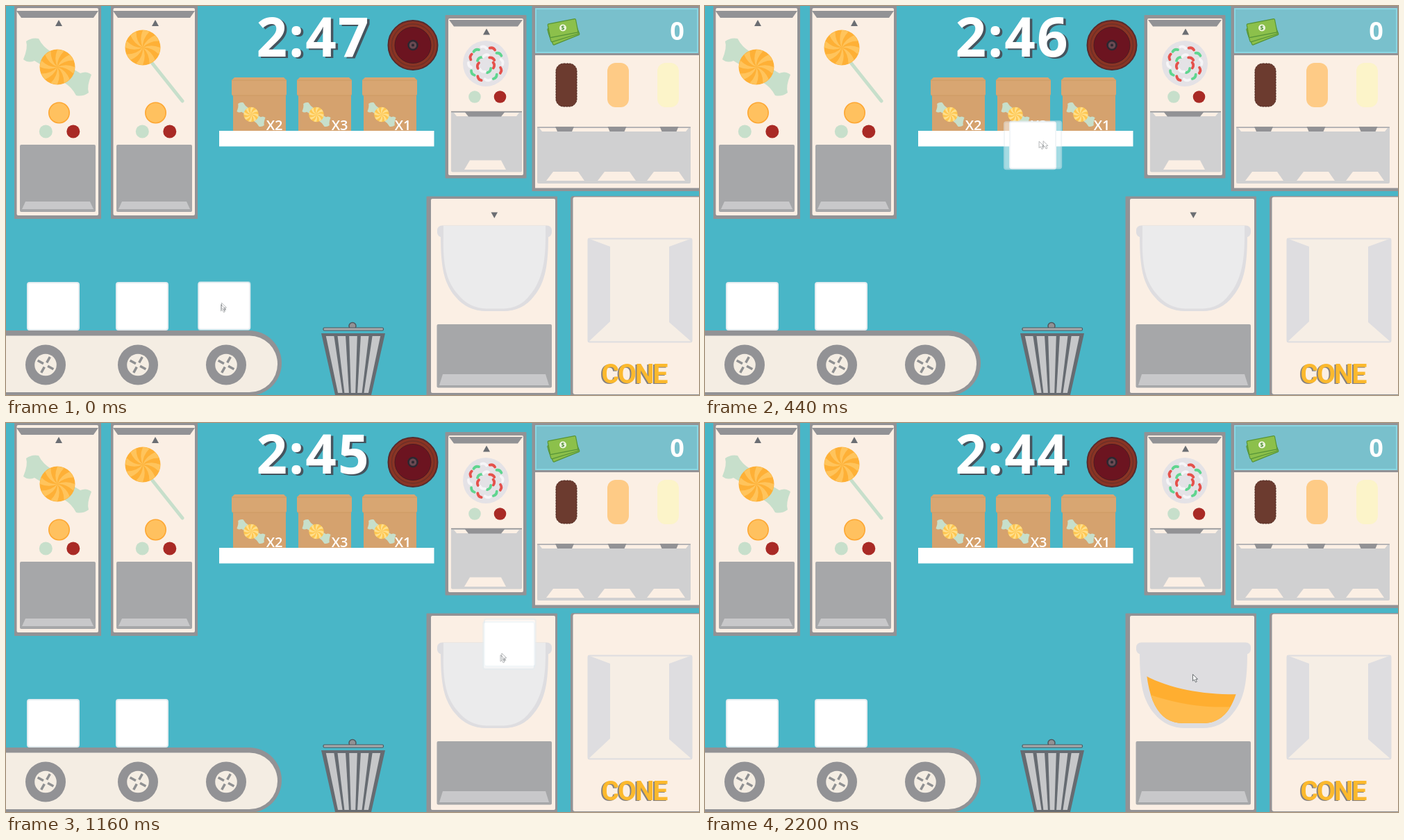
Write an HTML page that moves like this. It is 998x561 px and loops after 2.24 s.

```html
<!DOCTYPE html>
<html lang="en">
<head>
<meta charset="utf-8">
<title>Candy factory</title>
<style>
  html, body { margin: 0; width: 100%; height: 100%; overflow: hidden; background: #49b6c7; }
  svg { display: block; width: 100%; height: 100%; --base: #feb036; --ray: #ffc45c; }
  text { font-family: "Open Sans", "Noto Sans", sans-serif; font-weight: 700; fill: #fff; }
  .mid { text-anchor: middle; }
  .clock { font-size: 78px; letter-spacing: 2px; }
  .shade { fill: #46545e; }
  .count { font-size: 20px; font-weight: 600; text-anchor: end; }
  .sign text { font: 600 39px Roboto, "Open Sans", sans-serif; letter-spacing: -2px; }
  .pale { --base: #fec650; --ray: #ffdf8c; }
  .steel { fill: #929295; }
  .cream { fill: #fbefe4; }
  .dark { fill: #6b6e73; }
  .well { fill: #a6a7a9; }
  .tray { fill: #d0d0d1; }
  .lip { fill: #c8c8ca; }
  .mint { fill: #c7dfcb; }
  .red { fill: #a92a25; }
  .glass { fill: #dedde0; }
  .pair { isolation: isolate; }
  .pair use { opacity: .5; mix-blend-mode: plus-lighter; }
</style>
</head>
<body>
<svg viewBox="0 0 998 561" xmlns="http://www.w3.org/2000/svg">
  <defs>
    <rect id="cube" x="-37" y="-34" width="74" height="68" rx="3" fill="#fff" stroke="#e4ecf0" stroke-width="2"/>
    <path id="arrow" d="M0 0V9.500L2.200 7.500 4 11.300 5.800 10.400 4.100 6.800H7Z" fill="#fff" stroke="#5b6064" stroke-width=".9"/>
    <g id="swirl"><circle r="25.500" style="fill:var(--base)"/></g>
    <path id="twist" class="mint" d="M9 22Q21 29 27 41Q37 43 45 37Q42 28 49 11Q42 5 33 9L23 3Z"/>
    <g id="candy">
      <use href="#twist"/><use href="#twist" transform="rotate(180)"/><use href="#swirl"/>
    </g>
    <g id="vendor">
      <rect class="steel" x="12" y="-4" width="125" height="311"/>
      <rect class="cream" x="15.500" y="3" width="117.500" height="299" rx="2"/>
      <path class="steel" d="M15 7H133L126 17H22Z"/>
      <path class="dark" d="M71 29H81L76 20Z"/>
      <circle cx="76.500" cy="154" r="14.700" fill="#ffc15f" stroke="#fda733" stroke-width="1.600"/>
      <circle class="mint" cx="57.300" cy="181" r="9.500"/>
      <circle class="red" cx="96.800" cy="181" r="9.500"/>
      <rect class="well" x="20" y="200" width="109" height="97" rx="2"/>
      <path class="lip" d="M23 293 28 282H121L126 293Z"/>
    </g>
    <g id="carton">
      <path d="M327 126H403V180H327Z" fill="#d5a26e"/>
      <path d="M325 107 329 103H400L404 107V127Q404 129 402 129H327Q325 129 325 127Z" fill="#d8a672"/>
      <path d="M325 107H404M326 129H403" stroke="#cd9a63" fill="none"/>
      <use class="pale" href="#candy" transform="translate(353 156.500) scale(.42)"/>
    </g>
    <g id="wheel">
      <circle class="steel" r="29"/>
      <circle r="15.800" fill="#f4ede3"/>
      <path d="M3.500 0H13M-3.500 0H-13M0 3.500V13M0 -3.500V-13" transform="rotate(29)" stroke="#8f9092" stroke-width="3.500"/>
    </g>
    <path id="notch" class="steel" d="M-13.500 -3.500H13.500L10.500 3.500H-10.500Z"/>
    <path id="ramp" class="cream" d="M-28 252-18 239H18L27 252Z"/>
    <rect id="bill" x="-20.500" y="-10" width="41" height="20" rx="1.500" fill="#8cc04b" stroke="#569438" stroke-width="1.200"/>
    <path id="bowl" d="M626 330C626 378 631 400 647 419Q664 440 692 440H716Q744 440 760 419C776 400 781 376 781 330Z"/>
    <clipPath id="inside"><path d="M634 330C635 398 652 433 688 433H718C754 433 772 395 773 330Z"/></clipPath>
  </defs>

  <rect width="998" height="561" fill="#49b6c7"/>

  <use href="#vendor"/>
  <use href="#candy" transform="translate(74 88)"/>
  <use href="#vendor" x="139"/>
  <path d="M211 83 254 137" stroke="#c7dfcb" stroke-width="5" stroke-linecap="round"/>
  <use href="#swirl" transform="translate(197 60)"/>

  <g class="clock mid">
    <text class="time shade" x="446" y="75">2:47</text>
    <text class="time" x="442.500" y="73">2:47</text>
  </g>

  <g>
    <circle cx="586" cy="56.500" r="35.500" fill="#8a3424" stroke="#572b2d" stroke-width="2"/>
    <circle cx="586" cy="56.500" r="30.500" fill="none" stroke="#6e3027" stroke-width="1.500"/>
    <circle cx="586" cy="56.500" r="26" fill="#6c1420" stroke="#4b1a22"/>
    <circle cx="586" cy="56.500" r="6.500" fill="#6a4a52" stroke="#2b2831" stroke-width="2.500"/>
    <circle cx="586" cy="56.500" r="2" fill="#2b2831"/>
  </g>

  <use href="#carton"/><use href="#carton" x="94"/><use href="#carton" x="188"/>
  <text class="count" x="398.500" y="179">X2</text>
  <text class="count" x="492.500" y="179">X3</text>
  <text class="count" x="583.500" y="179">X1</text>
  <rect x="307" y="180" width="309.500" height="22.500" fill="#fff"/>

  <!-- sprinkles -->
  <g>
    <rect class="steel" x="632.500" y="13" width="117" height="235.500" rx="1"/>
    <rect class="cream" x="637" y="18" width="108" height="226" rx="2"/>
    <path class="steel" d="M638 20H744L737 29.500H645Z"/>
    <path class="dark" d="M687 41.500H697L692 32.500Z"/>
    <g transform="translate(691 83)" fill="none" stroke-width="3.800" stroke-linecap="round">
      <circle r="33" fill="#e4e2e6"/>
      <g id="sprinkles"></g>
    </g>
    <circle class="mint" cx="675" cy="131" r="8.800"/>
    <circle class="red" cx="711.500" cy="131" r="8.800"/>
    <rect class="tray" x="641" y="152" width="102" height="87.500" rx="2"/>
    <path class="cream" d="M645 154H739L735 159H649Z"/>
    <path d="M641 152.500H743" stroke="#929295" stroke-width="1.500"/>
    <path class="steel" d="M660 152H719L713 159.500H666Z"/>
    <path class="cream" d="M660 236 668 222.500H713L720 236Z"/>
  </g>

  <!-- money and sauces -->
  <g>
    <rect class="steel" x="757.500" y="-2" width="245" height="269"/>
    <rect x="763" y="4" width="233" height="63" fill="#79c0cc" stroke="#8ad7e3" stroke-width="2"/>
    <rect class="cream" x="762" y="71" width="240" height="191.500"/>
    <use href="#bill" transform="translate(803.500 39.500) rotate(-22)"/>
    <use href="#bill" transform="translate(802 36.500) rotate(-17)"/>
    <use href="#bill" transform="translate(802 32) rotate(-11)"/>
    <circle cx="802" cy="31.500" r="5" fill="#eef5de"/>
    <text class="mid" x="802" y="34.600" style="font-size:8.500px;fill:#4f9136">$</text>
    <text class="mid" x="966.500" y="49" style="font-size:36px">0</text>
    <rect x="792" y="83" width="30" height="62" rx="11" fill="#6c3b2f" stroke="#502a22" stroke-dasharray="3 1"/>
    <rect x="866" y="82" width="31" height="64" rx="12" fill="#fecb86"/>
    <rect x="938" y="82" width="31" height="64" rx="12" fill="#fcf4c9"/>
    <rect class="tray" x="765" y="174.500" width="221" height="81.500" rx="2"/>
    <path class="cream" d="M768 176H983L979 181H772Z"/>
    <path d="M765 175H986" stroke="#929295"/>
    <use href="#notch" x="804.500" y="177.500"/><use href="#notch" x="880" y="177.500"/><use href="#notch" x="955" y="177.500"/>
    <use href="#ramp" x="806"/><use href="#ramp" x="880"/><use href="#ramp" x="951"/>
  </g>

  <!-- mixer -->
  <g>
    <rect class="steel" x="605.500" y="274.500" width="188.500" height="290" rx="1"/>
    <rect class="cream" x="612" y="278" width="179" height="280" rx="2"/>
    <path id="hint" class="dark" d="M698.500 297.500H708L703.300 306Z"/>
    <rect class="glass" x="621" y="316.500" width="165" height="17" rx="7"/>
    <use class="glass" href="#bowl"/>
    <path id="empty" fill="#ebebec" d="M630 317H777V333C777 374 770 398 755 416Q741 436 716 436.500H692Q667 436 651 416C635 398 629 376 630 333Z"/>
    <g id="mix" clip-path="url(#inside)">
      <path id="back" fill="#ffae30"/>
      <path id="front" fill="#ffbb4d"/>
    </g>
    <rect class="well" x="620.500" y="459" width="165.500" height="91.500" rx="2"/>
    <path class="lip" d="M624 547 629 531H777L782 547Z"/>
  </g>

  <!-- cones -->
  <g>
    <rect class="steel" x="813" y="274" width="200" height="295" rx="4"/>
    <rect class="cream" x="816.500" y="275.500" width="200" height="284.500" rx="3"/>
    <rect x="838.500" y="335.500" width="149" height="149" rx="2" fill="#f6eee5" stroke="#dedde0" stroke-width="2"/>
    <path class="glass" d="M838 335 870 347V455L838 485ZM988 335 955 347V456L988 485Z"/>
    <g class="mid sign">
      <text x="902.500" y="545" style="fill:#85807f">CONE</text>
      <text x="904.500" y="544" style="fill:#fcb92d">CONE</text>
    </g>
  </g>

  <!-- conveyor -->
  <rect class="steel" x="-60" y="468" width="457" height="94" rx="47"/>
  <rect x="-60" y="475.500" width="451" height="81.500" rx="40.500" fill="#f4ede3"/>
  <use href="#wheel" x="57" y="517.500"/><use href="#wheel" x="190" y="517.500"/><use href="#wheel" x="317" y="517.500"/>
  <use href="#cube" x="68" y="433"/><use href="#cube" x="196" y="433"/>

  <!-- bin -->
  <g>
    <circle cx="499" cy="461.500" r="5" fill="#929295" stroke="#4f585e" stroke-width="1.500"/>
    <rect x="457" y="464" width="86.500" height="4" rx="1.500" fill="#a9abad" stroke="#4f585e" stroke-width="1.200"/>
    <path d="M454 472H546L526 561H474Z" fill="#666b71"/>
    <g id="slats" fill="#c6c7c9"></g>
  </g>

  <g class="pair" id="cubes"><use href="#cube"/><use href="#cube"/></g>
  <g class="pair" id="arrows"><use href="#arrow"/><use href="#arrow"/></g>
</svg>
<script>
const LOOP = 2240, STEP = 40, BLUR = 16, DROP = 1760;
const $ = id => document.getElementById(id);

// Repeated static parts
for (let a = 0; a < 360; a += 45)
  $('swirl').innerHTML += `<path d="M0 0Q11.8-5.5 25 0A25 25 0 0 1 23.1 9.6Q13-.6 0 0" style="fill:var(--ray)" transform="rotate(${a})"/>`;

const tints = ['#e5514b', '#5fd58f', '#f6f5f7'];
for (const [radius, count] of [[24, 12], [12, 7]])
  for (let i = 0; i < count; i++) {
    const tilt = 25 * Math.sin(i * 5 + radius);
    $('sprinkles').innerHTML += `<path d="M-1 -4Q2 0 -1 4" stroke="${tints[i % 3]}"
      transform="rotate(${i * 360 / count + radius}) translate(${radius}) rotate(${tilt})"/>`;
  }

for (let i = -2; i <= 2; i++) {
  const mid = 16.7 * i, top = x => 500 + x, low = x => 500 + x * .56;
  $('slats').innerHTML += `<path d="M${top(mid - 5.8)} 476H${top(mid + 5.8)}L${low(mid + 5.8)} 558H${low(mid - 5.8)}Z"/>`;
}

// Paths as [time, x, y, vx, vy]
const cubePath = [
  [0, 314, 433, 0, 0], [160, 342.5, 373.5, .2, -.48], [440, 472, 200, .21, 0],
  [840, 708, 235, .06, .06], [1160, 725, 319, -.06, .12], [1640, 705.5, 362.5, 0, 0]];
const arrowPath = [
  [0, 309.5, 430.5, 0, 0], [160, 361, 320, .27, -.54], [440, 484, 194.5, .14, 0],
  [840, 715, 247, .06, .07], [1160, 713, 333.5, -.06, .06], [1640, 700.5, 362, 0, 0],
  [2200, 702.5, 362.5, 0, 0]];

function at(path, t) {
  if (t <= path[0][0]) return path[0].slice(1, 3);
  const n = path.findIndex(k => k[0] > t);
  if (n < 0) return path[path.length - 1].slice(1, 3);
  const p = path[n - 1], q = path[n], d = q[0] - p[0], u = (t - p[0]) / d;
  const h = u * u * (3 - 2 * u);
  return [1, 2].map(i => p[i] * (1 - h) + q[i] * h
    + d * u * (1 - u) * ((1 - u) * p[i + 2] - u * q[i + 2]));
}

function placePair(group, path, t) {
  [...group.children].forEach((el, i) =>
    el.setAttribute('transform', `translate(${at(path, t + (i ? BLUR : -BLUR))})`));
}

const surface = (y, s, [a, b, c, d]) =>
  `M630 ${y + a * s}C670 ${y + b * s} 725 ${y + c * s} 778 ${y + d * s}V445H630Z`;

const show = (el, on) => el.setAttribute('visibility', on ? 'visible' : 'hidden');

function draw(t) {
  const left = 47 - (t >= 120) - (t >= 1120) - (t >= 2120);
  document.querySelectorAll('.time').forEach(el => el.textContent = '2:' + left);

  const mixing = t >= DROP;
  show($('hint'), !mixing);
  show($('empty'), !mixing);
  show($('mix'), mixing);
  show($('cubes'), !mixing);
  placePair($('cubes'), cubePath, t);
  placePair($('arrows'), arrowPath, t);

  if (mixing) {
    const sway = Math.cos((2200 - t) / 560 * 2 * Math.PI);
    $('back').setAttribute('d', surface(377, sway, [-15, 8, 16, 14]));
    $('front').setAttribute('d', surface(401, sway, [-13, 2, 14, 6]));
  }
}

function tick() {
  draw(Math.floor(performance.now() % LOOP / STEP) * STEP);
  requestAnimationFrame(tick);
}
tick();
</script>
</body>
</html>
```
